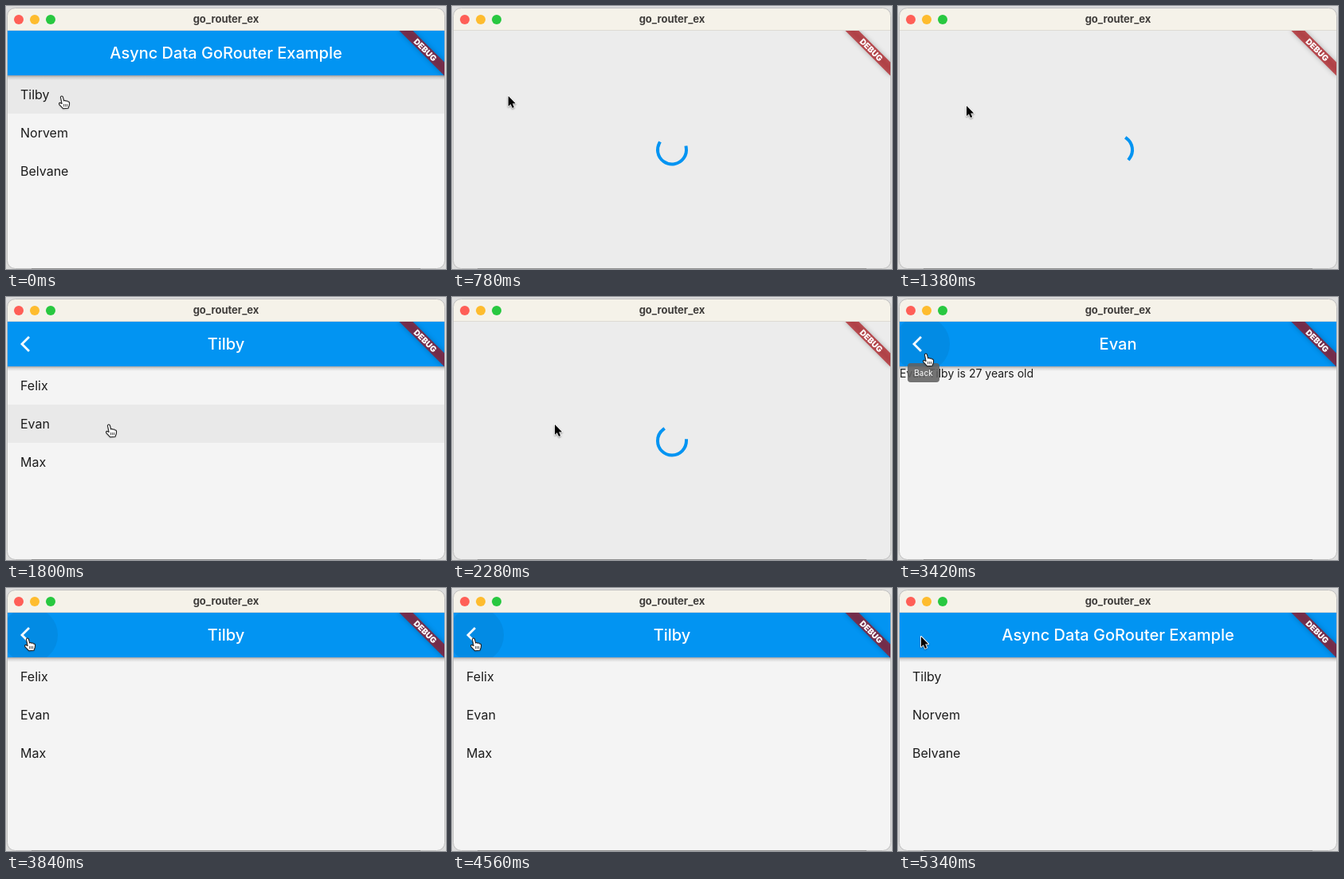
An HTML page with a canvas that plays this animation: 552 by 330 pixels, repeating every 5400 ms.

```html
<!DOCTYPE html>
<html lang="en">
<head>
<meta charset="utf-8">
<title>go_router_ex</title>
<style>
  html, body { margin: 0; width: 552px; height: 330px; overflow: hidden; background: #dcdcdc; }
  canvas { display: block; }
</style>
</head>
<body>
<canvas id="stage" width="552" height="330"></canvas>
<script>
const ctx = document.getElementById('stage').getContext('2d');
const LOOP = 5400, STEP = 60, SLIDE = 300;
const VIEW = { x: 2, y: 31, w: 548, h: 299 };
const BAR_BOTTOM = 87, ROW = 48;
const BLUE = '#0294f2', PAPER = '#f4f4f4', INK = '#1c1c1c';
const FONT = 'Inter, Roboto, sans-serif';

const HOME = { title: 'Async Data GoRouter Example', rows: ['Tilby', 'Norvem', 'Belvane'] };
const FAMILY = { title: 'Tilby', rows: ['Felix', 'Evan', 'Max'], back: true };
const PERSON = { title: 'Evan', rows: [], back: true, note: 'Evan Tilby is 27 years old' };
const LOADING = { loading: true };

// Navigation: when each screen arrives, and whether it is pushed, popped or swapped in.
const SCREENS = [
  { at: 0, page: HOME },
  { at: 430, page: LOADING, move: 'push' },
  { at: 1430, page: FAMILY },
  { at: 1890, page: LOADING, move: 'push' },
  { at: 2890, page: PERSON },
  { at: 3510, page: FAMILY, move: 'pop' },
  { at: 4620, page: HOME, move: 'pop' }
];

// Pointer stops: time, x, y
const POINTER = [
  [0, 70, 113], [1200, 71, 113], [1740, 129, 160], [2280, 129, 160],
  [2880, 72, 128], [3300, 40, 76], [3420, 35, 71], [3660, 27, 63],
  [4980, 27, 63], [5100, 29, 61]
];

const HAND = new Path2D('M-1.6 1.2Q-.4-1 1.3 .8L2.7 6Q4.2 4.8 5.1 6.3Q6.8 5.3 7.6 7Q9.3 6.6 9.6 8.7L9.3 11.6L8 15.3L1.6 15.7L-3.2 10.6Q-4 8.3-2 8.4L.1 9.6Z');
const HAND_LINES = new Path2D('M2.6 10V13.4M4.6 10V13.4M6.6 10V13.4');
const ARROW = new Path2D('M0 0V12.8L2.9 10L5 14.8L7.1 13.9L5 9.2H9Z');

const clamp = v => Math.max(0, Math.min(1, v));
const mix = (a, b, k) => a + (b - a) * k;

function bezier(x1, y1, x2, y2) {
  const at = (a, b, s) => 3 * a * s * (1 - s) ** 2 + 3 * b * s * s * (1 - s) + s ** 3;
  return x => {
    if (x <= 0 || x >= 1) return clamp(x);
    let lo = 0, hi = 1;
    for (let i = 0; i < 20; i++) {
      const mid = (lo + hi) / 2;
      if (at(x1, x2, mid) < x) lo = mid; else hi = mid;
    }
    return at(y1, y2, lo);
  };
}
const slideEase = bezier(0.35, 0.91, 0.33, 0.97);
const sweepEase = bezier(0.4, 0, 0.2, 1);

function text(label, x, y, font, color, align = 'left') {
  ctx.font = `${font} ${FONT}`;
  ctx.fillStyle = color;
  ctx.textAlign = align;
  ctx.fillText(label, x, y);
}

function circle(x, y, r, color) {
  ctx.fillStyle = color;
  ctx.beginPath();
  ctx.arc(x, y, r, 0, Math.PI * 2);
  ctx.fill();
}

function pointerAt(t) {
  let i = 0;
  while (i < POINTER.length - 2 && POINTER[i + 1][0] <= t) i++;
  const [t0, x0, y0] = POINTER[i], [t1, x1, y1] = POINTER[i + 1];
  const k = clamp((t - t0) / (t1 - t0)), e = k * k * (3 - 2 * k);
  return { x: mix(x0, x1, e), y: mix(y0, y1, e) };
}

function hoverAt(page, p) {
  if (page.loading) return null;
  if (p.y < BAR_BOTTOM) return page.back && Math.hypot(p.x - 30, p.y - 59) < 35 ? 'back' : null;
  const row = Math.floor((p.y - BAR_BOTTOM) / ROW);
  return row < page.rows.length ? row : null;
}

function drawSpinner(age) {
  const phase = age / 1333, part = phase % 1;
  const head = sweepEase(clamp(part * 2)), tail = sweepEase(clamp(part * 2 - 1));
  const start = Math.PI * (-0.5 + 1.5 * tail + 2 * age / 2222 + 0.5 * phase);
  const sweep = Math.max(1.5 * Math.PI * (head - tail), 0.001);
  ctx.strokeStyle = BLUE;
  ctx.lineWidth = 4;
  ctx.lineCap = 'square';
  ctx.beginPath();
  ctx.arc(276, 180.5, 18, start, start + sweep);
  ctx.stroke();
  ctx.lineCap = 'butt';
}

function drawBar(page, hover) {
  const shade = ctx.createLinearGradient(0, BAR_BOTTOM, 0, BAR_BOTTOM + 6);
  shade.addColorStop(0, 'rgba(0,0,0,.32)');
  shade.addColorStop(0.4, 'rgba(0,0,0,.12)');
  shade.addColorStop(1, 'rgba(0,0,0,0)');
  ctx.fillStyle = shade;
  ctx.fillRect(VIEW.x, BAR_BOTTOM, VIEW.w, 6);
  ctx.fillStyle = BLUE;
  ctx.fillRect(VIEW.x, VIEW.y, VIEW.w, BAR_BOTTOM - VIEW.y);
  text(page.title, 276, 66, '500 20px', '#fff', 'center');
  if (!page.back) return;
  if (hover === 'back') {
    ctx.save();
    ctx.beginPath();
    ctx.rect(VIEW.x, VIEW.y, VIEW.w, BAR_BOTTOM - VIEW.y);
    ctx.clip();
    circle(30, 59, 35, 'rgba(0,0,0,.06)');
    ctx.restore();
  }
  ctx.strokeStyle = '#fff';
  ctx.lineWidth = 2.8;
  ctx.beginPath();
  ctx.moveTo(29, 50);
  ctx.lineTo(20, 59);
  ctx.lineTo(29, 68);
  ctx.stroke();
}

function drawPage(page, dx, age, hover) {
  ctx.save();
  ctx.translate(dx, 0);
  if (page.loading) {
    drawSpinner(age);
  } else {
    ctx.fillStyle = PAPER;
    ctx.fillRect(VIEW.x, VIEW.y, VIEW.w, VIEW.h);
    page.rows.forEach((label, i) => {
      const y = BAR_BOTTOM + i * ROW;
      if (hover === i) {
        ctx.fillStyle = '#e9e9e9';
        ctx.fillRect(VIEW.x, y, VIEW.w, ROW);
      }
      text(label, 18, y + 29.5, '400 16px', INK);
    });
    if (page.note) text(page.note, 2, 101, '400 14px', INK);
    drawBar(page, hover);
  }
  ctx.restore();
}

function drawTooltip(t) {
  const alpha = clamp((t - 3270) / 150) * clamp((3585 - t) / 75);
  if (!alpha) return;
  ctx.save();
  ctx.globalAlpha = alpha;
  ctx.fillStyle = 'rgba(97,97,97,.88)';
  ctx.beginPath();
  ctx.roundRect(12, 83, 40, 24, 4);
  ctx.fill();
  text('Back', 32, 98.5, '400 10px', '#fff', 'center');
  ctx.restore();
}

function drawRibbon() {
  ctx.save();
  ctx.translate(VIEW.x + VIEW.w, VIEW.y);
  ctx.rotate(Math.PI / 4);
  ctx.shadowColor = 'rgba(0,0,0,.4)';
  ctx.shadowBlur = 6;
  ctx.fillStyle = 'rgba(175,10,18,.66)';
  ctx.fillRect(-40, 28, 80, 12);
  ctx.shadowColor = 'transparent';
  text('DEBUG', 0, 37.7, '900 10.2px', '#fff', 'center');
  ctx.restore();
}

function windowPath() {
  ctx.beginPath();
  ctx.roundRect(1.5, 2.5, 549, 327, 10);
}

function drawFrame() {
  ctx.fillStyle = '#f5f2e9';
  ctx.fillRect(0, 0, 552, VIEW.y);
  ['#ff5f57', '#febc2e', '#28c840'].forEach((c, i) => circle(16 + 20 * i, 17, 6, c));
  text('go_router_ex', 276, 21, '700 13px', '#3f3d3b', 'center');
  ctx.fillStyle = '#dedbd4';
  ctx.fillRect(0, VIEW.y - 1, 552, 1);
}

function drawPointer(p, hand) {
  ctx.save();
  ctx.translate(p.x, p.y);
  ctx.lineJoin = 'round';
  ctx.shadowColor = 'rgba(0,0,0,.3)';
  ctx.shadowBlur = 2;
  ctx.shadowOffsetY = 1;
  ctx.strokeStyle = hand ? '#222' : '#fff';
  ctx.lineWidth = hand ? 1.1 : 2;
  ctx.fillStyle = hand ? '#fff' : '#000';
  const shape = hand ? HAND : ARROW;
  if (!hand) ctx.stroke(shape);
  ctx.fill(shape);
  ctx.shadowColor = 'transparent';
  if (hand) {
    ctx.stroke(shape);
    ctx.lineWidth = 0.8;
    ctx.stroke(HAND_LINES);
  }
  ctx.restore();
}

function render(t) {
  const index = SCREENS.findLastIndex(s => s.at <= t);
  const { at, page, move } = SCREENS[index];
  const age = t - at, moving = move && age < SLIDE;
  const p = pointerAt(t);
  const hover = moving ? null : hoverAt(page, p);

  ctx.fillStyle = '#dcdcdc';
  ctx.fillRect(0, 0, 552, 330);
  ctx.save();
  windowPath();
  ctx.clip();
  ctx.fillStyle = '#ececec';
  ctx.fillRect(0, 0, 552, 330);

  ctx.save();
  ctx.beginPath();
  ctx.rect(VIEW.x, VIEW.y, VIEW.w, VIEW.h);
  ctx.clip();
  if (moving) {
    const k = slideEase(age / SLIDE), other = SCREENS[index - 1].page;
    const push = move === 'push';
    const under = push ? other : page, over = push ? page : other;
    const shown = push ? k : 1 - k;
    drawPage(under, -VIEW.w / 3 * shown, age, null);
    drawPage(over, VIEW.w * (1 - shown), age, null);
  } else {
    drawPage(page, 0, age, hover);
  }
  drawTooltip(t);
  drawRibbon();
  ctx.restore();

  drawFrame();
  ctx.restore();
  windowPath();
  ctx.strokeStyle = '#bcbcbc';
  ctx.lineWidth = 1;
  ctx.stroke();
  ctx.fillStyle = '#8f8f8f';
  ctx.fillRect(32, 329, 488, 1);
  drawPointer(p, hover !== null);
}

function tick() {
  const t = performance.now() % LOOP;
  render(Math.floor(t / STEP) * STEP);
  requestAnimationFrame(tick);
}
tick();
</script>
</body>
</html>
```
